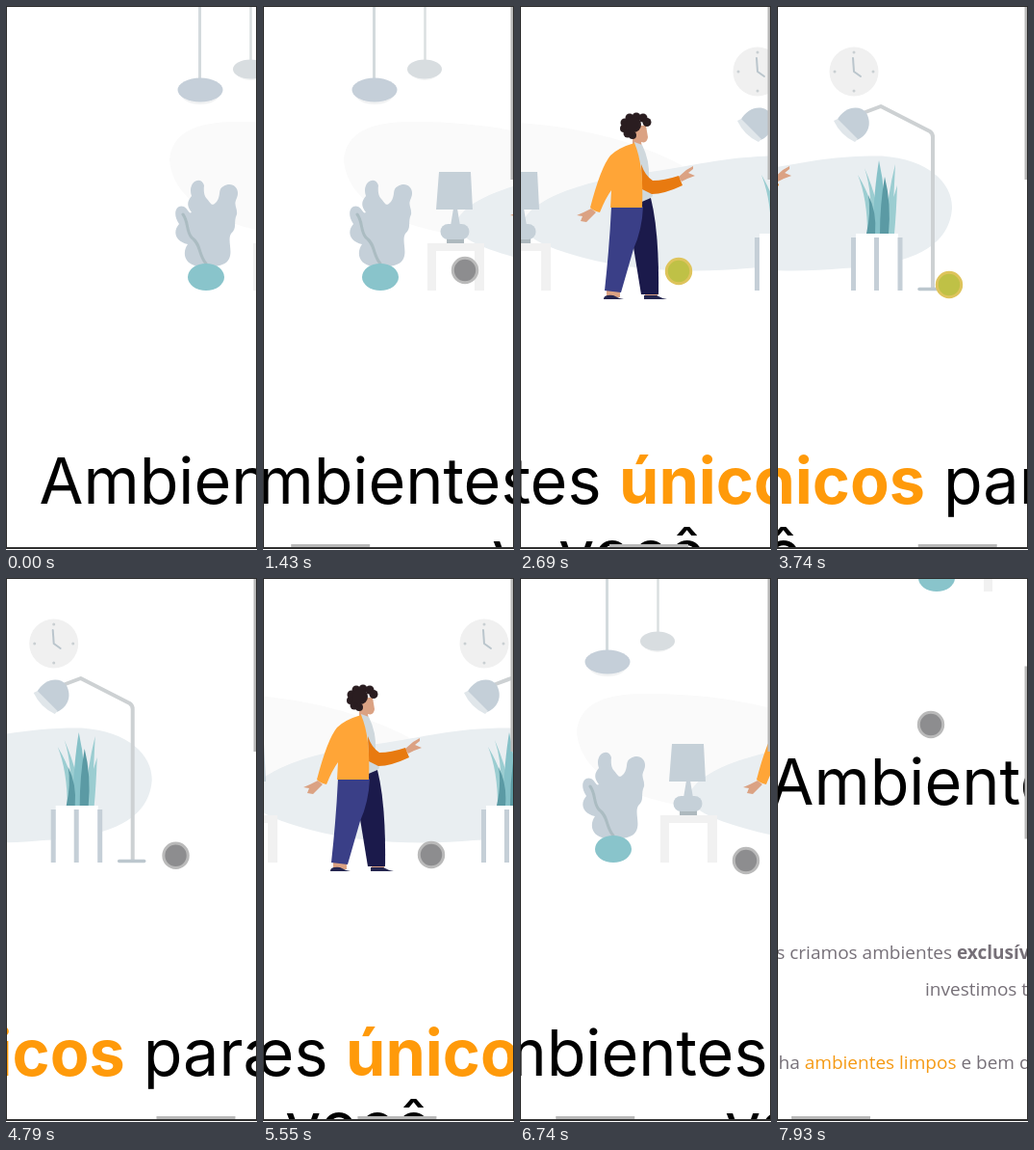
An HTML page for the animation above (8000 ms loop, 261 px wide and 564 px high).

```html
<!DOCTYPE html>
<html lang="pt">
<head>
<meta charset="utf-8">
<title>Ambientes</title>
<style>
  html, body { margin: 0; width: 100%; height: 100%; overflow: hidden; background: #fff; }
  svg { display: block; }
  .title { font: 400 66.5px Inter, Roboto, sans-serif; fill: #000; }
  .title .hot { font-weight: 700; fill: #ff9a0a; }
  .copy { font: 400 19px "Open Sans", "Noto Sans", sans-serif; fill: #767078; }
  .copy .strong { font-weight: 700; }
  .copy .hot { fill: #f59a14; }
  .line { fill: none; stroke-linecap: round; stroke-linejoin: round; }
  #touch { fill: #8d8d8f; stroke: #bababa; stroke-width: 3; }
  #touch.warm { fill: #bfc146; stroke: #dec45c; }
  .thumb { fill: #b9b9b9; }
</style>
</head>
<body>
<svg width="261" height="564" viewBox="0 0 261 564">
  <defs><clipPath id="screen"><rect x="1" y="1" width="259" height="560"/></clipPath></defs>
  <g clip-path="url(#screen)">
    <g id="page">
      <!-- backdrop -->
      <path fill="#fafafa" d="M170 160C172 130 200 119 245 120C330 120 400 138 452 165C470 200 420 243 330 243C250 236 175 215 170 160Z"/>
      <path fill="#e9eef1" d="M288 222C300 197 360 179 420 172C470 165 500 155 560 155.500C610 159 634 185 633 210C630 250 590 269 520 272C470 277 400 275 350 261C310 250 285 240 288 222Z"/>

      <!-- pendant lamps -->
      <path class="line" stroke="#d3dadd" stroke-width="3" d="M201.5 -5V78"/>
      <path class="line" stroke="#dadfe0" stroke-width="2.5" d="M254.5 -5V58"/>
      <ellipse cx="202" cy="91" rx="20" ry="11" fill="#f1f2f3"/>
      <ellipse cx="202" cy="87" rx="23.5" ry="12.5" fill="#c5cfd9"/>
      <ellipse cx="254" cy="68" rx="15" ry="9" fill="#f3f4f4"/>
      <ellipse cx="254" cy="65.5" rx="18" ry="10" fill="#d8dde0"/>

      <!-- potted cactus -->
      <path fill="#c5d0d9" d="M196 269C184 265 184 254 189 247C176 244 173 234 180 226C172 214 178 205 185 208C190 211 190 216 193 214C187 206 189 202 193 197C188 182 203 175 206 186C205 194 207 198 209 200C214 206 214 208 219 203C224 196 220 190 226 187C236 181 244 190 240 199C236 207 241 209 240 216C236 224 241 230 234 236C230 243 236 254 232 262C228 270 218 271 196 269Z"/>
      <path class="line" stroke="#abbcc2" stroke-width="3" d="M184 216C190 224 187 233 193 240C203 247 200 258 208 267"/>
      <ellipse cx="208" cy="281" rx="19" ry="14" fill="#89c4cb"/>

      <!-- side table and lamp -->
      <path fill="#f1f1f1" d="M257 246H316V295H306V254H266V295H257Z"/>
      <path fill="#c5d0d8" d="M269 172H302L304 211H266ZM284 210H288L291 228H281Z"/>
      <rect x="277" y="240" width="18" height="6" fill="#aeb9be"/>
      <rect x="270.500" y="226" width="30" height="16" rx="8" fill="#c5d0d8"/>

      <!-- walker -->
      <g transform="translate(284)">
        <path fill="#dba283" d="M74 210L66 214L59 217L65 218L63 223L69 224L79 214ZM165 177L173 170L180 166L180 169L175 173L182 176L174 179L168 182ZM117 124H131L133 136Q132 143 126 141L127 147L117 145ZM90 293H104V302H90ZM130 296H143V302H130Z"/>
        <path fill="#cfd8dd" d="M119 141L127 144Q135 160 134 178L138 197L124 209Z"/>
        <path fill="#e87a10" d="M126 164Q130 176 138 181Q150 181 165 176L169 186Q150 195 137 195L127 190Z"/>
        <path fill="#1b1a4b" d="M122 205L136 199Q145 235 144 299H126L117 244Z"/>
        <path fill="#3a3f87" d="M95 208H128Q127 232 118 252L105 297L88 295Q93 250 95 208Z"/>
        <path fill="#ffa537" d="M119 142Q102 147 94 155Q84 167 73 209Q77 213 83 214Q89 199 95 191L94 209H127Q129 165 119 142Z"/>
        <path fill="#25264f" d="M87 304Q87 299 97 300Q102 303 108 304ZM129 304V300H142Q147 303 153 304Z"/>
        <g fill="#2a1d20">
          <circle cx="114" cy="116" r="4.500"/><circle cx="121" cy="115" r="4.500"/>
          <circle cx="128" cy="116" r="4.500"/><circle cx="132" cy="120.500" r="4.500"/>
          <circle cx="109" cy="121" r="4.500"/><circle cx="108" cy="127" r="4"/>
          <circle cx="112" cy="132" r="4.500"/><circle cx="117" cy="134" r="4"/>
          <circle cx="118" cy="123" r="8"/>
        </g>
      </g>

      <!-- clock, floor lamp and planter -->
      <g transform="translate(451)">
        <circle cx="80" cy="68" r="25.500" fill="#f0f0f0"/>
        <path class="line" stroke="#bac5cc" stroke-width="2" d="M79 54L80 68L87 73"/>
        <path class="line" stroke="#c9cfd2" stroke-width="3" d="M80 48h0M100 68h0M80 88h0M60 68h0"/>
        <path class="line" stroke="#cdd1d3" stroke-width="4" d="M92 110L108 104L159 130Q162 132 162 136V292"/>
        <path class="line" stroke="#bcc7ce" stroke-width="3.500" d="M148 293.500H174"/>
        <path fill="#c4cfd8" d="M62 119L83 139C95 134 99 122 93 111C86 102 70 104 62 119Z"/>
        <path fill="#e0e6ea" d="M59 119L63 117L84 138L81 141Q66 134 59 119Z"/>
        <path fill="#9bcdd1" d="M94 236Q94 200 84 175Q102 205 104 236ZM97 236Q100 195 91 168Q107 205 108 236ZM112 236Q115 195 123 164Q121 200 120 236ZM114 236Q117 210 125 186Q124 215 122 236Z"/>
        <path fill="#86c1c8" d="M99 236Q101 190 106 160Q114 195 112 236Z"/>
        <path fill="#5b9aa4" d="M93 236Q98 214 95 196Q104 214 102 236ZM107 236Q107 206 112 177Q119 205 116 236Z"/>
        <rect x="82" y="236" width="44" height="59" fill="#fff"/>
        <path fill="#c5cfd7" d="M77 240h5v55h-5ZM101 240h5v55h-5ZM125.500 240h5v55h-5Z"/>
      </g>

      <g class="title">
        <text x="34.500" y="516">Ambientes</text>
        <text x="387" y="516" class="hot">únicos</text>
        <text x="624" y="516">para</text>
        <text x="324" y="591">você</text>
      </g>
      <g class="copy">
        <text x="15.500" y="676">Nós criamos ambientes <tspan class="strong">exclusívos</tspan> para cada pessoa,</text>
        <text x="196" y="714">investimos tempo em cada detalhe.</text>
        <text x="12" y="790">Tenha <tspan class="hot">ambientes limpos</tspan> e bem decorados</text>
      </g>
    </g>

    <g id="overlay">
      <rect id="hbar" class="thumb" x="1.500" y="558" width="82" height="3"/>
      <rect id="vbar" class="thumb" x="257.500" y="1" width="2.500" height="179"/>
      <circle id="touch" r="12.700"/>
    </g>
  </g>
  <path fill="#2e2e2e" d="M0 0H261V563H0ZM1 1V561H260V1Z" fill-rule="evenodd"/>
</svg>

<script>
const LOOP = 8000, START = 380, STEP = 69.81, BAR = 0.322;
const el = id => document.getElementById(id);
const page = el('page'), overlay = el('overlay'), touch = el('touch');
const hbar = el('hbar'), vbar = el('vbar');

// Monotone cubic curve through [step, value] points
function curve(points) {
  const last = points.length - 1;
  const slope = i => (points[i + 1][1] - points[i][1]) / (points[i + 1][0] - points[i][0]);
  const tangent = i => {
    if (i === 0) return slope(0);
    if (i === last) return slope(last - 1);
    const a = slope(i - 1), b = slope(i);
    return a * b <= 0 ? 0 : 2 * a * b / (a + b);
  };
  return k => {
    if (k <= points[0][0]) return points[0][1];
    if (k >= points[last][0]) return points[last][1];
    const i = points.findIndex(p => p[0] > k) - 1;
    const [k0, v0] = points[i], [k1, v1] = points[i + 1];
    const h = k1 - k0, u = (k - k0) / h, w = 1 - u;
    return v0 * w * w * (1 + 2 * u) + v1 * u * u * (3 - 2 * u)
      + h * u * w * (tangent(i) * w - tangent(i + 1) * u);
  };
}

const scrollX = curve([[0, 2], [15, 86], [33, 284], [48, 451], [57, 530], [74, 301], [91, 111], [97, 42], [108, 42]]);
const scrollY = curve([[98, 0], [108, 281]]);
const touchX = curve([[0, 238], [15, 210], [33, 165], [48, 179], [74, 175], [91, 235], [98, 165], [108, 160]]);
const touchY = curve([[0, 272], [15, 274], [33, 275], [48, 289], [74, 287], [91, 293], [98, 432], [108, 152]]);

function draw(now) {
  const k = Math.floor((now % LOOP - START) / STEP);
  const active = k >= 0;
  const x = active ? scrollX(k) : 0, y = active ? scrollY(k) : 0;
  page.setAttribute('transform', `translate(${-x} ${-y})`);
  overlay.setAttribute('visibility', active ? 'visible' : 'hidden');
  hbar.setAttribute('transform', `translate(${x * BAR})`);
  vbar.setAttribute('transform', `translate(0 ${y * BAR})`);
  touch.setAttribute('transform', `translate(${touchX(k)} ${touchY(k)})`);
  touch.classList.toggle('warm', k >= 24 && k < 60);
  requestAnimationFrame(() => draw(performance.now() - origin));
}
const origin = performance.now();
draw(0);
</script>
</body>
</html>
```
